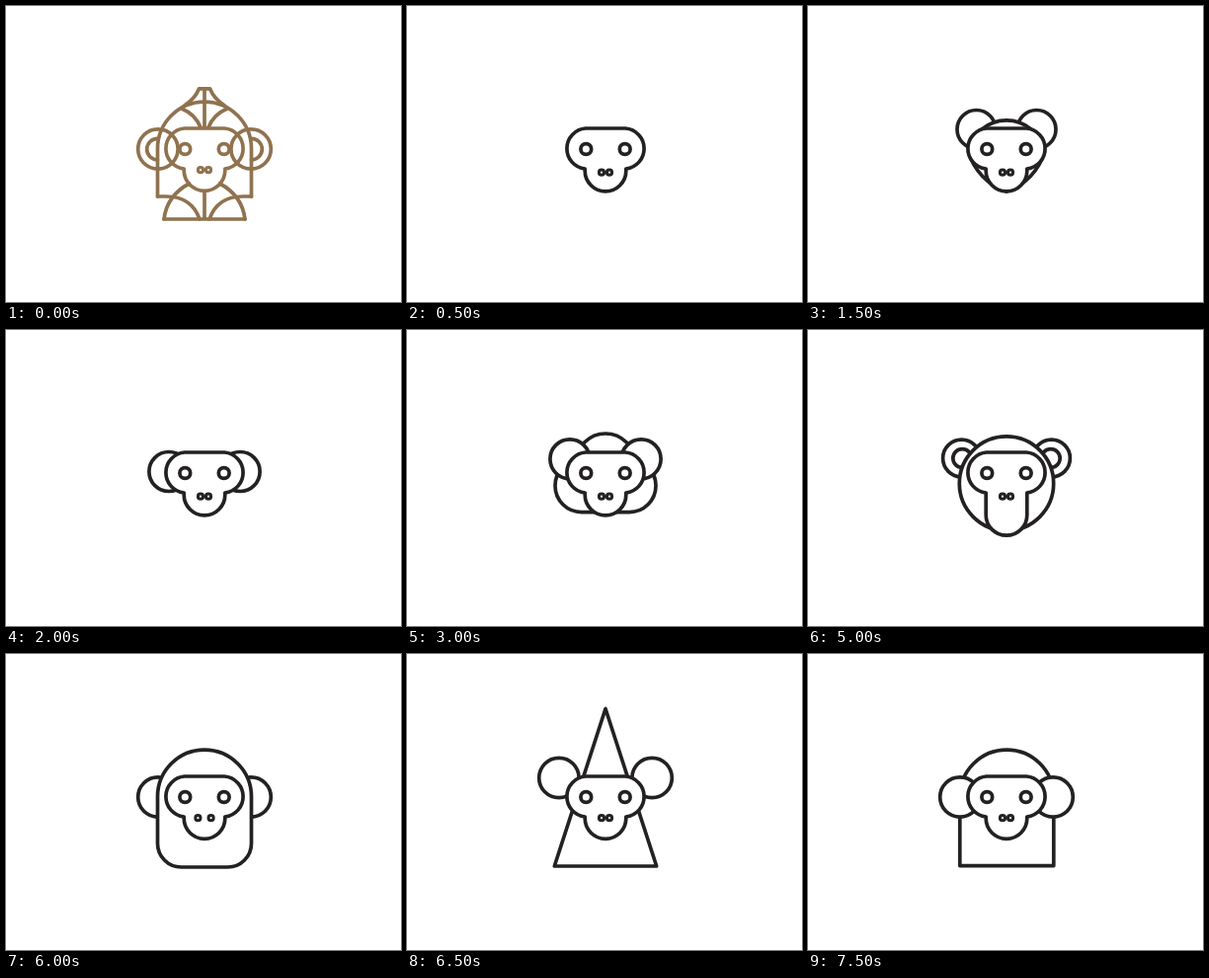
Write an HTML page that moves like this. It is 400x300 px and loops after 8000 ms.

```html
<!DOCTYPE html>
<html lang="en">
<head>
<meta charset="utf-8">
<title>Monkey studies</title>
<style>
html, body { margin: 0; width: 100%; height: 100%; overflow: hidden; background: #fff; }
svg { display: block; width: 400px; height: 300px; }
g.pose {
  fill: #fff; stroke: #242122; stroke-width: 3.7;
  stroke-linejoin: round; stroke-linecap: round;
  visibility: hidden; animation: show 8s step-end infinite;
}
g.gold { fill: none; stroke: #90724f; }
@keyframes show {
  0% { visibility: visible; }
  6.25%, 100% { visibility: hidden; }
}
</style>
</head>
<body>
<svg id="stage" viewBox="0 0 400 300"></svg>
<script>
const MID = 201;
const circle = (x, y, r) => `<circle cx="${x}" cy="${y}" r="${r}"/>`;
const path = (d, extra = '') => `<path d="${d}" ${extra}/>`;
// A pair of circles mirrored about the middle line
const pair = (dx, y, r) => circle(MID - dx, y, r) + circle(MID + dx, y, r);
// A path mirrored about the middle line
const twin = d => path(d) + path(d, `transform="matrix(-1 0 0 1 ${2 * MID} 0)"`);

function face({ chin = 167, noseY = 168.7, noseDx = 4 } = {}) {
  return path(`M180.8 124H221.2a20.6 20.6 0 0 1 .6 41V${chin}a20.8 20.8 0 0 1-41.6 0V165a20.6 20.6 0 0 1 .6-41Z`) +
    pair(19.7, 145, 5.4) +
    `<g stroke-width="3">${pair(noseDx, noseY, 2.6)}</g>`;
}

const skull = circle(MID, 148.6, 39);
const wedge = path('M162.6 148A39 39 0 0 1 239.4 148A60 60 0 0 1 201 188A60 60 0 0 1 162.6 148Z');
const bigHead = y => circle(MID, y, 47.7);
const wideEars = y => pair(36.1, y, 20);
const farEars = y => pair(45.5, y, 18.9);
const sideEars = y => pair(47.1, y, 20.2);
const highNose = { chin: 166.5, noseY: 166.2 };
const dome = 'V144.6a47.5 47.5 0 0 1 95 0';
const cone = path('M201 55.5L149.3 215H252.7Z');

const ornate = path(`M153.5 193${dome}V193`) +
  sideEars(145) + face(highNose) +
  twin('M153.5 134.3a10.8 10.8 0 0 0 0 21.6') +
  path('M201 84V123M201 188V216M160 216H242') +
  twin('M201 83.8H195.5Q191.5 94 180.5 101') +
  twin('M178 104Q192 110 197 123') +
  twin('M153.5 193H162Q188 193 196 216') +
  twin('M160 216Q163 192 185.5 180');

const seated = pair(30.5, 125, 19.5) + wedge + face();

const poses = [
  ornate,
  face(),
  wideEars(143.5) + skull + face(),
  seated,
  wideEars(143.5) + face(),
  wideEars(130.8) + face(),
  circle(MID, 135, 30) +
    '<rect x="150" y="131" width="102" height="53.6" rx="26.8"/>' +
    wideEars(130.8) + face(),
  skull + face(),
  seated,
  farEars(111) + skull + face(),
  farEars(130) + pair(44.8, 130, 9.4) + bigHead(155.6) + face({ chin: 187.4 }),
  farEars(145) + bigHead(171.5) + face(),
  sideEars(145) +
    path(`M153.5 192${dome}V192a24 24 0 0 1-24 24H177.5a24 24 0 0 1-24-24Z`) +
    face({ ...highNose, noseDx: 6.6 }),
  cone + sideEars(125.5) + face(highNose),
  cone + sideEars(145) + face(highNose),
  path(`M153.8 214.6${dome}V214.6Z`) + sideEars(145) + face(highNose)
];

// Each pose holds for half a second; negative delays keep all in step
document.getElementById('stage').innerHTML = poses.map((art, i) =>
  `<g class="pose${i ? '' : ' gold'}" style="animation-delay:${i ? i * 500 - 8000 : 0}ms">${art}</g>`
).join('');
</script>
</body>
</html>
```
